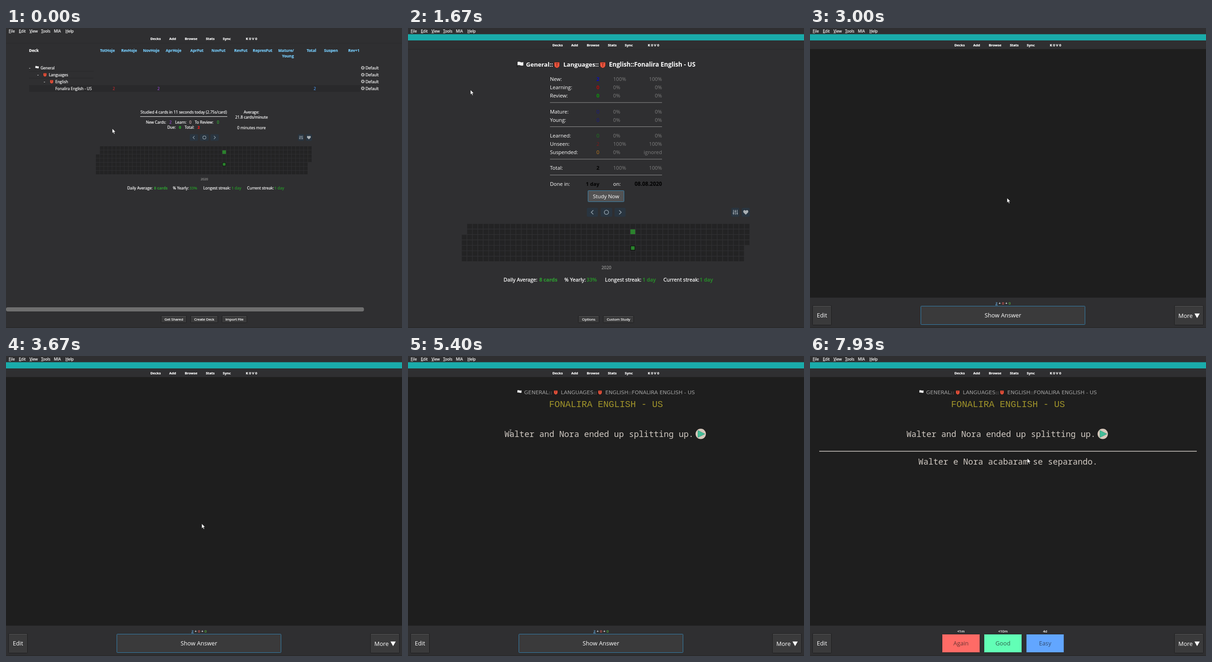
An HTML page that plays this animation: 859 px wide and 652 px high, repeating every 8 s.

```html
<!DOCTYPE html>
<html lang="en">
<head>
<meta charset="utf-8">
<title>Flashcard review</title>
<style>
html, body { margin: 0; width: 100%; height: 100%; overflow: hidden; background: #2f2f31; }
svg { display: block; width: 859px; height: 652px; }
text { font-family: "Open Sans", "Noto Sans", sans-serif; white-space: pre; }
.mono { font-family: "Noto Sans Mono", monospace; }
.courier { font-family: "Liberation Mono", monospace; }
.wide { font-family: "DejaVu Sans", sans-serif; }
</style>
</head>
<body>
<svg id="stage" viewBox="0 0 859 652" xmlns="http://www.w3.org/2000/svg"></svg>
<script>
const LOOP = 8000, STEP = 1000 / 15;
const BG = '#2f2f31', WHITE = '#fff', GREY = '#7d7d7d', GREEN = '#298a2b', SKY = '#77ccfb';
const DECK = 'Fonalira English - US';
const ANCHORS = { l: 'start', m: 'middle', r: 'end' };

const esc = s => String(s).replace(/&/g, '&amp;').replace(/</g, '&lt;');
const rect = (x, y, w, h, fill, more = '') =>
  `<rect x="${x}" y="${y}" width="${w}" height="${h}" fill="${fill}" ${more}/>`;
const path = (d, fill, more = '') => `<path d="${d}" fill="${fill}" ${more}/>`;
const hline = (x1, x2, y, color, w = 1) => rect(x1, y - w / 2, x2 - x1, w, color);
const group = (id, body, more = '') => `<g id="${id}" ${more}>${body}</g>`;

// Small type gets a hairline stroke so that it reads as crisply as hinted text.
function text(x, y, s, { size = 8.4, fill = WHITE, at = 'l', w = 400, cls = '' } = {}) {
  const crisp = size < 10 ? `stroke="${fill}" stroke-width=".22"` : '';
  return `<text x="${x}" y="${y}" font-size="${size}" fill="${fill}" font-weight="${w}" ` +
    `text-anchor="${ANCHORS[at]}" class="${cls}" ${crisp}>${esc(s)}</text>`;
}

function flag(x, y, k) {
  return `<g transform="translate(${x} ${y}) scale(${k})">` +
    path('M0 0H1V12H0Z', '#111') + path('M1 .6Q4 -.4 7 1T13 .8V7.8Q10 9 7 7.8T1 7.6Z', '#f2f2f2') + '</g>';
}
function shield(x, y, k) {
  return `<g transform="translate(${x} ${y}) scale(${k})">` +
    path('M-6 -6.5H6V1Q6 5 0 7Q-6 5 -6 1Z', '#f0573f', 'stroke="#3a1512" stroke-width=".8"') +
    path('M-3 -3.5H3M0 -3.5V3.5', 'none', 'stroke="#8c2a20" stroke-width="1.5"') + '</g>';
}
function button(x, y, w, h, label, size, more = {}) {
  const { fill = '#3a3a3b', edge = '#1d1d1e', ink = WHITE, top = '#5a5a5b' } = more;
  return rect(x + .5, y + .5, w - 1, h - 1, fill, `rx="1" stroke="${edge}"`) +
    (top ? hline(x + 2, x + w - 2, y + 1.5, top) : '') +
    text(x + w / 2, y + h / 2 + size * .36, label, { size, at: 'm', fill: ink });
}

function menu() {
  const items = [['File', 6], ['Edit', 28], ['View', 51], ['Tools', 76], ['MIA', 104], ['Help', 129]];
  return items.map(([s, x]) => text(x, 9.5, s, { size: 8.3 }) +
    (s === 'MIA' ? '' : hline(x, x + 5, 10.8, WHITE, .8))).join('');
}
function toolbar(y) {
  return [['Decks', 324.5], ['Add', 361.5], ['Browse', 401.5], ['Stats', 443], ['Sync', 479], ['K 0 V 0', 532.5]]
    .map(([s, x]) => text(x, y, s, { size: 7.6, w: 700, at: 'm' })).join('');
}

// Yearly activity map, drawn around the middle of its navigation row.
function heatmap(y, k) {
  const P = 8.85, pos = (c, r) => [-235 + P * c, 19 + P * r];
  let cells = '';
  for (let c = 0; c < 53; c++) for (let r = 0; r < 7; r++) {
    if ((c === 0 && r < 2) || (c === 52 && r > 3)) continue;
    const [x, y0] = pos(c, r);
    cells += `M${x.toFixed(2)} ${y0.toFixed(2)}h7.8v7.8h-7.8z`;
  }
  const [gx, g1] = pos(31, 1), g4 = pos(31, 4)[1];
  const pad = (x, w) => rect(x - w / 2, -7.3, w, 14.6, '#293540', 'rx="2"');
  const ink = 'stroke="#8d9ba5" stroke-width="1.2"';
  const stat = (x, label, x2, value, w, fill) =>
    text(x, 112.5, label) + text(x2, 112.5, value, { w, fill });
  return `<g transform="translate(430 ${y}) scale(${k})">` +
    pad(-22.5, 18) + pad(0.3, 19) + pad(22.5, 18) + pad(210, 13) + pad(227, 13) +
    path('M-21 -3.4L-24.4 0L-21 3.4M21 -3.4L24.4 0L21 3.4', 'none', ink) +
    `<circle cx=".3" cy="0" r="3.4" fill="none" ${ink}/>` +
    path('M207 -4V4M210 -4V4M213 -4V4M205.8 1.5h2.4M208.8 -1.5h2.4M211.8 2h2.4', 'none', 'stroke="#a3adb5" stroke-width="1"') +
    path('M227 4L223.2 .2Q222.2 -2.8 224.6 -3.6Q226.4 -3.8 227 -2.2Q227.6 -3.8 229.4 -3.6Q231.8 -2.8 230.8 .2Z', '#aab0b4') +
    path(cells, '#232324') + rect(gx, g1, 7.8, 7.8, '#2b822d') +
    rect(gx + .4, g4 + .4, 7, 7, '#2b822d', 'stroke="#050505" stroke-width=".9"') +
    text(.3, 92.5, '2020', { size: 7, fill: '#929292', at: 'm' }) +
    stat(-167, 'Daily Average:', -109, '8 cards', 700, '#2f9432') +
    stat(-68, '% Yearly:', -32, '33%', 600, GREEN) +
    stat(-2, 'Longest streak:', 59, '1 day', 600, GREEN) +
    stat(93, 'Current streak:', 152, '1 day', 600, GREEN) + '</g>';
}

function deckList() {
  const heads = [['TotHoje', 220], ['RevHoje', 267], ['NovHoje', 315], ['AprHoje', 363.5], ['AprFut', 414],
    ['NovFut', 461], ['RevFut', 509.5], ['RepresFut', 556.5], ['Mature/', 607.5], ['Total', 662.5],
    ['Suspen', 705], ['Rev+1', 754.5]];
  const num = (x, y, s, fill, w = 400) => text(x, y, s, { fill, w, at: 'm' });
  const gear = y => `<circle cx="774" cy="${y}" r="2.4" fill="none" stroke="#b9b9b9" stroke-width="1.6"/>` +
    `<circle cx="774" cy="${y}" r="3.6" fill="none" stroke="#b9b9b9" stroke-width="1.2" stroke-dasharray="1.4 1.43"/>`;
  const rows = [90, 105, 119.5, 134.5];
  return toolbar(26) + hline(0, 859, 33, '#2a2a2c') + rect(50, 124, 719, 14.5, '#29292b') +
    text(50, 52, 'Deck', { w: 700, size: 8.5 }) +
    heads.map(([s, x]) => text(x, 52, s, { fill: SKY, w: 700, at: 'm' })).join('') +
    text(611.5, 63.5, 'Young', { fill: SKY, w: 700, at: 'm' }) +
    hline(50, 190, 94, '#29292b') + hline(50, 190, 109, '#29292b') +
    [50, 68, 82].map((x, i) => text(x, rows[i], '-')).join('') +
    flag(63, 82.5, .62) + shield(84.5, 101.8, .58) + shield(99, 116.8, .58) +
    ['General', 'Languages', 'English', DECK].map((s, i) => text([75, 93, 107, 107][i], rows[i], s)).join('') +
    group('link', hline(107, 189, 136, WHITE, .8)) +
    num(234, 134.5, 2, '#c92b2e') + num(331, 134.5, 2, '#9a48d8') + num(670, 134.5, 2, '#4c9ffb') +
    rows.map(y => gear(y - 3.4) + text(780, y, 'Default')).join('') +
    text(385.5, 185.5, 'Studied 4 cards in 11 seconds today (2.75s/card)', { at: 'm' }) +
    hline(291, 480, 192.5, '#e8e8e8') +
    text(303.5, 207.5, 'New Cards:') + num(357, 207.5, 2, '#9a48d8') +
    text(367, 207.5, 'Learn:') + num(400, 207.5, 0, '#d8b5b5') +
    text(409.5, 207.5, 'To Review:') + num(460, 207.5, 0, '#33b833') +
    text(350, 219, 'Due:') + num(377.5, 219, 0, '#22c025', 700) +
    text(387.5, 219, 'Total:') + num(418, 219, 2, '#ff1a1a', 700) +
    text(532.5, 185.5, 'Average:', { at: 'm' }) + text(532.5, 197, '21.8 cards/minute', { at: 'm' }) +
    text(532.5, 219.5, '0 minutes more', { at: 'm' }) +
    heatmap(238, 1) + rect(0, 607, 776.5, 9, '#6f6f6f', 'rx="4"') +
    button(336, 625, 56, 16, 'Get Shared', 7.8) + button(400, 625, 60, 16, 'Create Deck', 7.8) +
    button(468, 625, 55, 16, 'Import File', 7.8);
}

function overview() {
  const rows = [
    [115, 'New:', 2, '#0a0ac0', 700, '100%', '100%'],
    [133, 'Learning:', 0, '#b80808', 700, '0%', '0%'],
    [151, 'Review:', 0, '#0b970b', 700, '0%', '0%'],
    [185.5, 'Mature:', 0, '#191985', 400, '0%', '0%'],
    [203.5, 'Young:', 0, '#191985', 400, '0%', '0%'],
    [238, 'Learned:', 0, '#1c7a1c', 400, '0%', '0%'],
    [256, 'Unseen:', 2, '#7d1a1a', 400, '100%', '100%'],
    [274, 'Suspended:', 0, '#c07a1c', 400, '0%', 'ignored'],
    [308, 'Total:', 2, '#000', 700, '100%', '100%']];
  const size = 11.1, title = { size: 13.05, w: 700 };
  return flag(236.5, 73, 1.05) + shield(323, 80.5, .97) + shield(422.5, 80.5, .97) +
    text(256, 84, 'General::', title) + text(337, 84, 'Languages::', title) +
    text(436, 84, 'English::' + DECK, { size: 13.25, w: 700 }) +
    rows.map(([y, name, n, fill, w, a, b]) => text(308, y, name, { size }) +
      text(415, y, n, { size, fill, w, at: 'r' }) + text(445, y, a, { size, fill: GREY }) +
      text(551, y, b, { size, fill: GREY, at: 'r' })).join('') +
    [162, 214.5, 285, 319.5].map(y => hline(308, 551, y, '#929292')).join('') +
    text(308, 342.5, 'Done in:', { size }) + text(415, 342.5, '1 day', { size, w: 700, fill: '#000', at: 'r' }) +
    text(445, 342.5, 'on:', { size }) + text(551, 342.5, '08.08.2020', { size: 11.6, w: 700, fill: '#000', at: 'r' }) +
    button(390, 353, 79, 25, 'Study Now', 11.4, { fill: '#525253', edge: '#3b85ad', top: '' }) +
    group('hover', button(390, 353, 79, 25, 'Study Now', 11.4, { fill: '#656566', edge: '#3b85ad', top: '' })) +
    heatmap(400.5, 4 / 3) +
    button(369, 625, 46, 16, 'Options', 7.8) + button(423, 625, 67, 16, 'Custom Study', 7.8);
}

function review() {
  const head = { size: 11.35, fill: '#a2a2a2', cls: 'wide' };
  const card = { size: 18, fill: '#d1cac3', cls: 'mono' };
  const count = (x, s, fill) => text(x, 601, s, { size: 7.8, at: 'm', fill });
  const rate = (x, name, time, fill, ink) =>
    button(x, 604, 83, 41, name, 12.7, { fill, ink, top: '', edge: '#252527' }) + count(x + 41.5, time, WHITE);
  return rect(0, 46, 859, 540, '#1e1e1e') +
    group('question',
      flag(236.5, 74, .75) + shield(320.5, 79.3, .66) + shield(416.5, 79.3, .66) +
      text(252, 82.5, 'GENERAL::', head) + text(331.5, 82.5, 'LANGUAGES::', head) +
      text(428, 82.5, 'ENGLISH::' + DECK.toUpperCase(), head) +
      text(429.5, 111, DECK.toUpperCase(), { size: 19.6, fill: '#9f932a', at: 'm', cls: 'courier' }) +
      text(209.2, 176, 'Walter and Nora ended up splitting up.', card) +
      '<circle cx="635" cy="169.3" r="11.2" fill="#d6c8bb"/>' +
      path('M629 161.8L644 169.4L629 177Z', '#43bd98', 'stroke="#2b8f72" stroke-width=".7"')) +
    group('answer', hline(20, 839, 207, '#cfcac5', 1.5) +
      text(429.5, 236, 'Walter e Nora acabaram se separando.', { ...card, at: 'm' })) +
    button(5, 603, 42, 43, 'Edit', 12.7) + button(790, 603, 64, 43, '', 12.7) +
    text(799, 629.6, 'More', { size: 12.7 }) + path('M834 620.5H845.4L839.7 630.5Z', WHITE) +
    group('show', count(404.5, 2, '#6cb8f0') + hline(402, 407, 602.6, '#6cb8f0', .8) + count(411.5, '+', WHITE) +
      count(418.7, 0, '#f0605c') + count(426, '+', WHITE) + count(433, 0, '#5cc43c') +
      button(240, 604, 357, 41, 'Show Answer', 12.7, { edge: '#3580ad', top: '' })) +
    group('rate', rate(286, 'Again', '<1m', '#ff6b66', '#6b3634') +
      rate(377, 'Good', '<10m', '#62ffb6', '#2f5f4b') + rate(468.5, 'Easy', '4d', '#62a6ff', '#314a70'));
}

document.getElementById('stage').innerHTML =
  rect(0, 0, 859, 652, BG) + menu() +
  group('decks', deckList()) +
  group('band', rect(0, 13.5, 859, 13.5, '#1aabaa') + toolbar(39.5) + hline(0, 859, 46, '#29292b')) +
  group('overview', overview()) + group('review', review()) +
  hline(0, 859, 651, '#28282a', 1.5) +
  group('cursor',
    group('arrow', path('M0 0V10.2L2.4 8.1L4 11.9L5.7 11.2L4.1 7.4H7.3Z', '#fff', 'transform="translate(-.5 -.5)" stroke="#151515" stroke-width=".6"')) +
    group('hand', path('M-1 0Q0 -1 1 0V4.5L5.5 5.6Q7 6 6.6 8L5.8 13H-1.4L-4 8.6Q-3.4 7 -1 8.2Z', '#fff', 'stroke="#151515" stroke-width=".7"')) +
    group('beam', path('M-2 -6H-.5L0 -5.5L.5 -6H2M0 -5.5V5.5M-2 6H-.5L0 5.5L.5 6H2', 'none', 'stroke="#c4c4c4" stroke-width=".9"')));

// Pointer route: time, x, y
const ROUTE = [
  [0, 231, 219], [67, 225, 192], [133, 214, 162], [200, 214, 162], [267, 262, 150], [333, 347, 142],
  [400, 285, 128], [467, 215, 125], [533, 187, 130], [600, 187, 130], [800, 165, 154], [1000, 143, 143],
  [1200, 136, 135], [1800, 136, 135], [2200, 280, 236], [2467, 405, 345], [2667, 428, 370], [2933, 428, 370],
  [3800, 424, 363], [4133, 290, 270], [4467, 142, 152], [4667, 124, 146], [4933, 140, 127], [5200, 190, 150],
  [5467, 230, 168], [6333, 289, 168], [6533, 241, 229], [6933, 612, 230], [7200, 497, 168], [7333, 494, 168],
  [7933, 472, 223], [8000, 472, 223]];

const same = (a, b) => a[1] === b[1] && a[2] === b[2];
const slope = (i, k) => {
  const a = ROUTE[i - 1], b = ROUTE[i], c = ROUTE[i + 1];
  if (!a || !c || same(a, b) || same(b, c)) return 0;
  const u = (b[k] - a[k]) / (b[0] - a[0]), v = (c[k] - b[k]) / (c[0] - b[0]);
  return u * v > 0 ? 2 * u * v / (u + v) : 0;
};
function pointer(t) {
  const i = Math.max(0, ROUTE.findIndex(p => p[0] > t) - 1);
  const a = ROUTE[i], b = ROUTE[i + 1], d = b[0] - a[0], s = Math.min(1, (t - a[0]) / d);
  return [1, 2].map(k => {
    const m = slope(i, k) * d, n = slope(i + 1, k) * d, q = 1 - s;
    return (1 + 2 * s) * q * q * a[k] + s * q * q * m + s * s * (3 - 2 * s) * b[k] - s * s * q * n;
  });
}

const el = id => document.getElementById(id);
const show = (id, on) => { el(id).style.display = on ? '' : 'none'; };
const ramp = (t, a, b) => Math.max(0, Math.min(1, (t - a) / (b - a)));
const within = (t, a, b) => t >= a && t < b;

function draw(now) {
  const t = Math.floor((now % LOOP) / STEP + .05) * STEP + .5;
  const linked = within(t, 460, 700) || t >= 1060;
  const hand = within(t, 460, 700) || within(t, 1060, 1460);
  const beam = within(t, 5390, 7660);
  show('decks', t < 1666);
  show('band', t >= 1666);
  show('overview', within(t, 1666, 3000));
  show('review', t >= 3000);
  show('link', linked);
  show('hover', t >= 2465);
  show('show', t < 5465);
  show('rate', t >= 5465);
  el('question').style.opacity = ramp(t, 3730, 3930);
  el('answer').style.opacity = ramp(t, 5440, 5660);
  show('hand', hand);
  show('beam', beam);
  show('arrow', !hand && !beam);
  const [x, y] = pointer(Math.min(t, LOOP - 1));
  el('cursor').setAttribute('transform', `translate(${x.toFixed(2)} ${y.toFixed(2)})`);
}

const start = performance.now();
function tick() {
  draw(performance.now() - start);
  requestAnimationFrame(tick);
}
tick();
</script>
</body>
</html>
```
